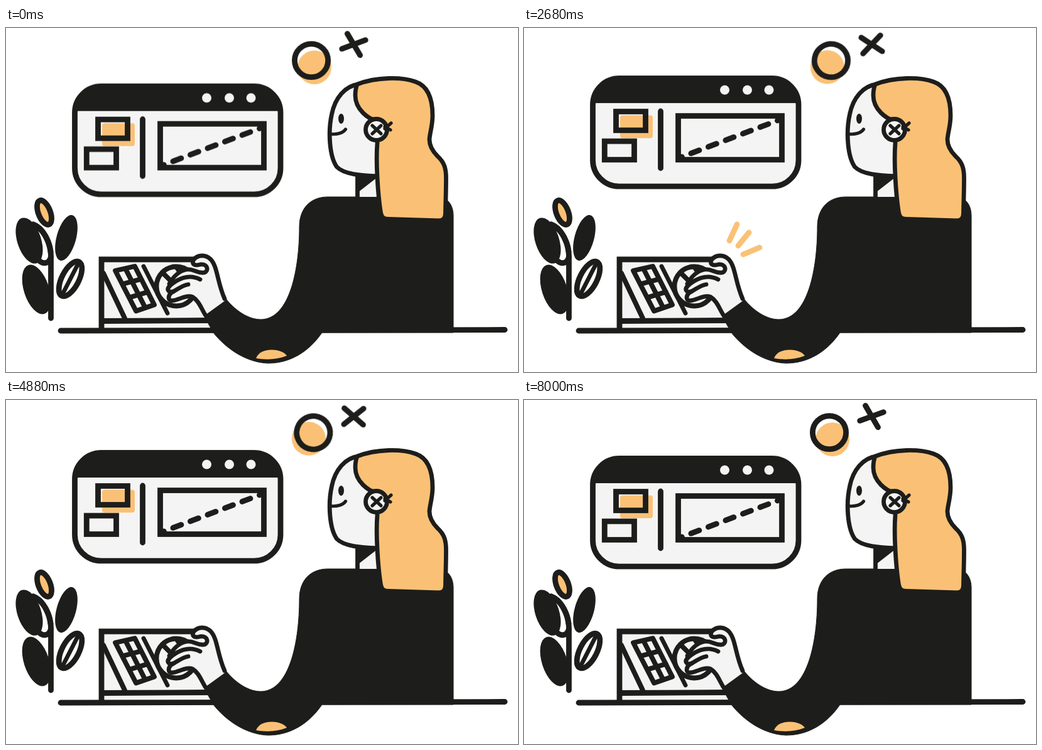
Write an HTML page that moves like this. It is 815 px wide and 550 px high and loops after 8040 ms.

```html
<!DOCTYPE html>
<html lang="en">
<head>
<meta charset="utf-8">
<title>Working at a laptop</title>
<style>
  html, body { margin: 0; width: 100%; height: 100%; overflow: hidden; background: #fff; }
  svg { display: block; width: 815px; height: 550px; }
  :root { --ink: #1d1d1b; --sun: #fac176; --pale: #f4f4f4; }

  .line { fill: none; stroke: var(--ink); stroke-width: 8.8; stroke-linecap: round; stroke-linejoin: round; }
  .sharp { stroke-linejoin: miter; }
  .medium { stroke-width: 7.8; }
  .thin { stroke-width: 6.8; }
  .fine { stroke-width: 5.2; }
  .ink { fill: var(--ink); }
  .sun { fill: var(--sun); }
  .pale { fill: var(--pale); }
  .white { fill: #fff; }

  /* two 4 s cycles, then a short rest */
  .float, .cross, .orbit, .spark { animation: 8040ms linear -25ms infinite; }
  .float { animation-name: float; }
  .cross { animation-name: cross; transform-origin: 553.5px 26.3px; }
  .orbit { animation-name: orbit; transform-origin: 487.4px 54.9px; }
  .spark { animation-name: spark; stroke: var(--sun); stroke-dasharray: 1 2; }

  @keyframes float {
    0%, 49.7512%, 99.5025%, 100% { transform: translateY(0); }
    24.8756%, 74.6269% { transform: translateY(-20px); }
  }
  @keyframes cross {
    0%, 49.7512%, 99.5025%, 100% { transform: rotate(0deg); }
    24.8756%, 74.6269% { transform: rotate(-41deg); }
  }
  @keyframes orbit {
    0%, 99.5025%, 100% { transform: rotate(0deg); }
    49.7512% { transform: rotate(81deg); }
  }
  @keyframes spark {
    0%, 27.3631% { stroke-dashoffset: 1; visibility: hidden; }
    27.3632% { stroke-dashoffset: 1; visibility: visible; }
    33.3333%, 40.2985% { stroke-dashoffset: 0; visibility: visible; }
    46.2686% { stroke-dashoffset: 1; visibility: visible; }
    46.2687%, 100% { stroke-dashoffset: 1; visibility: hidden; }
  }
</style>
</head>
<body>
<svg viewBox="0 0 815 550">
  <!-- floating window -->
  <g class="float">
    <rect class="pale" x="109.5" y="93.5" width="327.5" height="172.7" rx="42"/>
    <path class="ink" d="M109.5 133V132A42 38.5 0 0 1 151.5 93.5H395A42 38.5 0 0 1 437 132V133Z"/>
    <rect class="line" x="109.5" y="93.5" width="327.5" height="172.7" rx="42"/>
    <g class="pale">
      <circle cx="319.5" cy="112" r="7.5"/>
      <circle cx="355.5" cy="112" r="7.5"/>
      <circle cx="390" cy="112" r="7.5"/>
    </g>
    <rect class="sun" x="153" y="152.5" width="52" height="36.5" rx="4"/>
    <g class="line sharp">
      <rect x="146.5" y="146.5" width="47" height="30"/>
      <rect x="128.3" y="194" width="47.2" height="29.5"/>
      <rect x="245.5" y="153.5" width="165" height="70"/>
    </g>
    <path class="line" d="M217.5 146V237"/>
    <path class="line" stroke-dasharray="14 15.45" stroke-dashoffset="12.5" d="M250 219.5L406 160"/>
  </g>

  <!-- ring and cross -->
  <g class="orbit">
    <circle class="sun" cx="491" cy="63" r="27"/>
    <circle class="line" cx="486" cy="52" r="26.6"/>
  </g>
  <path class="line cross" d="M543.5 9L563.5 43.6M534.7 33.2L572.3 19.4"/>

  <!-- plant -->
  <path class="line white" d="M43 314C60 320 72 345 71.5 366C68 379 57 378 50 369"/>
  <path class="line" d="M71.5 464V366"/>
  <g class="ink">
    <ellipse cx="37" cy="340" rx="19" ry="38" transform="rotate(-18 37 340)"/>
    <ellipse cx="96" cy="335.5" rx="15.5" ry="37.5" transform="rotate(15 96 335.5)"/>
    <ellipse cx="48.5" cy="418" rx="20" ry="41" transform="rotate(-18 48.5 418)"/>
  </g>
  <path class="line" d="M43 314C58 319 69 340 71 358"/>
  <g transform="rotate(27 102.5 401)">
    <ellipse class="line white" cx="102.5" cy="401" rx="13.5" ry="30.5"/>
    <path class="line thin" d="M102.5 374V428"/>
  </g>
  <ellipse class="line sun" cx="61" cy="295" rx="9.5" ry="20.5" transform="rotate(-21 61 295)"/>

  <!-- laptop -->
  <path class="pale" d="M152 370H310L335 484H152Z"/>
  <path class="line sharp" d="M152 482V370H306M152 468.5L325 467.5"/>
  <path class="line medium" d="M155 392L189 464"/>
  <path class="line medium" d="M174 388L205 381L236 442.5L207 452.5ZM190 384.500L221.500 447M185 409.500L215 401.500M196 431L226 422"/>
  <path class="line thin" d="M219 381L257 456"/>
  <circle class="line medium" cx="271" cy="413" r="31.5"/>
  <path class="line medium" d="M249 391L264 406M272 383L282 398"/>

  <!-- desk and body -->
  <path class="line" d="M87 484L794 482.500"/>
  <path class="ink" stroke="#1d1d1b" d="M467 318C467 287 486 270 512 270H690C704 272 712 284 712 300V487H503
    C482 518 452 536 417 536C385 535 352 515 330 487L314 458L350 433C368 455 388 466 406 466
    C452 465 467 385 467 318Z"/>
  <path class="sun" d="M398 528C402 518 412 514.500 423 514.500C435 514.500 444 519 447 524C432 530 415 531 398 528Z"/>

  <!-- hand -->
  <path class="pale" d="M298 371C306 362 318 362 326 370C336 382 337 408 350 435L317 459
    C311 448 306 434 297 430C286 427 276 436 262 436C255 434 257 426 264 422C254 421 256 413 262 408
    C270 394 283 384 300 386L316 391C323 386 320 377 310 378C299 382 295 377 298 371Z"/>
  <g class="line thin">
    <path d="M348 433C336 406 337 382 326 370C318 362 306 362 299 370C295 377 299 381 310 378
      C321 377 323 388 316 391C304 393 300 385 288 386C276 388 266 398 260 409"/>
    <path d="M309 402C290 392 272 402 261 412C254 419 260 424 267 421C276 416 282 411 290 410"/>
    <path d="M267 421C257 426 257 436 264 436C276 435 286 426 297 430C307 436 311 449 318 460"/>
  </g>

  <!-- sparks above the hand -->
  <g class="line">
    <path class="spark" pathLength="1" d="M327 340L339 314"/>
    <path class="spark" pathLength="1" d="M341 348L358 327"/>
    <path class="spark" pathLength="1" d="M349 362L375 351"/>
  </g>

  <!-- neck and head -->
  <path class="pale" d="M560 232H596V270H560Z"/>
  <path class="ink" d="M558 234L592 238L560 263Z"/>
  <path class="line thin" stroke-linecap="butt" d="M559.500 235V271"/>
  <path class="line thin pale" d="M592 237C565 236 538 234 526.500 222C514.500 205 512.500 165 518.500 138C523.500 112 540 92 562 90L600 150Z"/>
  <path class="line thin sun" d="M559 90C590 78 630 78 652 86C675 94 679 120 679 140C679 156 675 166 674 178
    C674 190 680 198 687 205C698 215 700.500 225 700.500 240C700.500 265 699.500 285 699.500 296
    C699.500 304 696 308 688 308L608 305.500C600 305.500 597.500 302 596 292C592 265 588.500 215 591 184
    L590 148C577 146 556 130 556 108C556 100 557 95 559 90Z"/>
  <circle class="line thin pale" cx="589.500" cy="162.500" r="17"/>
  <path class="line fine" d="M583 156L597 169M597 156L583 169M603 161L613 152M603 158L612 163"/>
  <ellipse class="ink" cx="533.500" cy="145" rx="4.500" ry="8"/>
  <path class="line fine" d="M517 169.500C526 170.500 536 168.500 540.500 162"/>
</svg>
</body>
</html>
```
